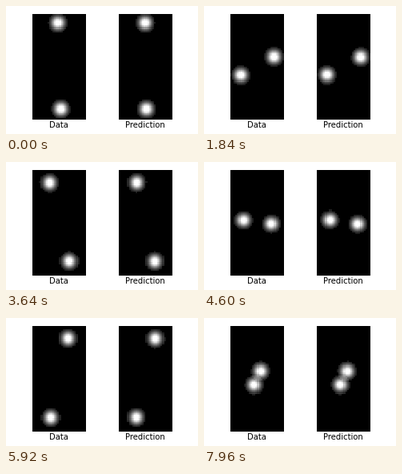
Recreate the animation shown at these times as a matplotlib script. Size 240 by 160 pixels, loop 8000 ms.

```python
import math
import numpy as np
import matplotlib.pyplot as plt
from matplotlib.animation import FuncAnimation

W, H, DPI = 240, 160, 80
FRAMES, STEP = 200, 40
COLS, ROWS = 32, 64
PANEL_W, PANEL_H, TOP, BASELINE = 67, 132, 10, 152

# Kepler orbit of two equal bodies: pixels and milliseconds
SEMI, ECC = 31.5, 0.708
MINOR = SEMI * math.sqrt(1 - ECC ** 2)
PERIOD, PERI_TIME = 3215, 4774
CENTER = (33.8, 65)
PEAK, SIGMA, FLOOR = 1.15, 5.6, 0.11

plt.rcParams["font.family"] = "DejaVu Sans"

gx, gy = np.meshgrid((np.arange(COLS) + 0.5) * PANEL_W / COLS,
                     (np.arange(ROWS) + 0.5) * PANEL_H / ROWS)


def orbit(t):
    """Offset of one body from the common centre at time t."""
    mean = math.remainder(2 * math.pi * (t - PERI_TIME) / PERIOD, 2 * math.pi)
    ecc_anom = mean + ECC * math.sin(mean)
    for _ in range(12):
        err = ecc_anom - ECC * math.sin(ecc_anom) - mean
        ecc_anom -= err / (1 - ECC * math.cos(ecc_anom))
    return MINOR * math.sin(ecc_anom), SEMI * (math.cos(ecc_anom) - ECC)


def render(t, tilt):
    x, y = orbit(t)
    c, s = math.cos(tilt), math.sin(tilt)
    dx, dy = c * x - s * y, s * x + c * y
    img = np.zeros((ROWS, COLS))
    for sign in (1, -1):
        d2 = (gx - CENTER[0] - sign * dx) ** 2 + (gy - CENTER[1] - sign * dy) ** 2
        blob = PEAK * np.exp(-d2 / (2 * SIGMA ** 2))
        img += np.where(blob < FLOOR, 0, blob)
    return np.clip(img, 0, 1)


fig = plt.figure(figsize=(W / DPI, H / DPI), dpi=DPI, facecolor="white")


def add_panel(left, label, tilt):
    ax = fig.add_axes([left / W, 1 - (TOP + PANEL_H) / H,
                       PANEL_W / W, PANEL_H / H])
    ax.axis("off")
    im = ax.imshow(render(0, tilt), cmap="gray", vmin=0, vmax=1,
                   interpolation="nearest", aspect="auto")
    fig.text((left + PANEL_W / 2 - 0.5) / W, 1 - BASELINE / H, label,
             fontsize=9, ha="center", va="baseline", color="black")
    return im, tilt


panels = [add_panel(33, "Data", -0.012),
          add_panel(141, "Prediction", 0.008)]


def update(frame):
    for im, tilt in panels:
        im.set_data(render(frame * STEP, tilt))
    return [im for im, _ in panels]


anim = FuncAnimation(fig, update, frames=FRAMES, interval=STEP,
                     repeat=True, repeat_delay=0, blit=False)
plt.show()
```
